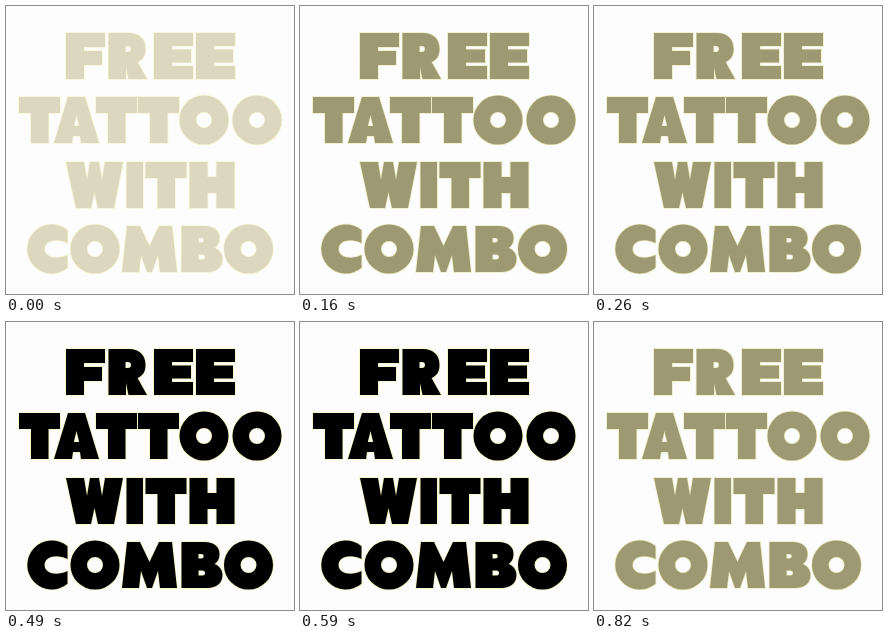
An HTML page for the animation above (980 ms loop, 288 by 288 pixels).

```html
<!DOCTYPE html>
<html lang="en">
<head>
<meta charset="utf-8">
<title>Free tattoo with combo</title>
<style>
  html, body { margin: 0; width: 100%; height: 100%; overflow: hidden; background: #fdfdfe; }
  svg { display: block; width: 100%; height: 100%; }
  path { fill-rule: evenodd; stroke-width: 1.6; paint-order: stroke; }
</style>
</head>
<body>
<svg viewBox="0 0 288 288" role="img" aria-label="Free tattoo with combo"></svg>
<script>
// Heavy geometric capitals, 46 units tall, measured from their top left corner.
const glyphs = {
  F: 'M0 0H39V14H18V18H36V32H18V46H0Z',
  R: 'M0 0H20C32 0 37 7 37 16C37 23 34 27 29 29L38.5 46H20L17.5 34V46H0Z M17 13V19H19.5A3 3 0 0 0 19.5 13Z',
  E: 'M0 0H39V13H18V16.5H37V29.5H18V33H39V46H0Z',
  T: 'M0 0H41V16H29.5V46H12V16H0Z',
  A: 'M14 0H31L45 46H27L26 39H19L18 46H0Z M22.5 18L19.8 29H25.2Z',
  O: 'M0 23A24.5 24.5 0 0 1 49 23A24.5 24.5 0 0 1 0 23Z M16.5 23A8 8 0 0 0 32.5 23A8 8 0 0 0 16.5 23Z',
  W: 'M0 0H18L21 18L24 0H33L36 18L39 0H57L48 46H32L28.5 30L25 46H10Z',
  I: 'M0 0H16.5V46H0Z',
  H: 'M0 0H18V15H27V0H45V46H27V31H18V46H0Z',
  C: 'M40 4.2A24.5 24.5 0 1 0 40 41.8V29C30 34 17 32 17 23C17 14 30 12 40 17Z',
  M: 'M5 0H18L27.5 20L37 0H50L55 46H38L36 29L30 46H25L19 29L17 46H0Z',
  B: 'M0 0H23C33 0 38 5 38 12C38 17 36 20 33 22C38 24 41 28 41 33C41 41 35 46 26 46H0Z'
    + 'M17 12V16.5H20A2.2 2.2 0 0 0 20 12Z M17 28.5V33.5H21A2.5 2.5 0 0 0 21 28.5Z'
};

const lines = [
  { word: 'FREE', y: 27, x: [60, 102.5, 148, 190] },
  { word: 'TATTOO', y: 91, x: [13, 48, 90, 132, 173.5, 226.5] },
  { word: 'WITH', y: 156, x: [60, 120.5, 139.5, 183.5] },
  { word: 'COMBO', y: 220, x: [21.5, 64.5, 116, 175.5, 218] }
];

const svg = document.querySelector('svg');
svg.innerHTML = lines.map(({ word, y, x }) =>
  [...word].map((letter, i) =>
    `<path d="${glyphs[letter]}" transform="translate(${x[i]} ${y})"/>`
  ).join('')
).join('');

// Fill and edge tint of each fade level, from faint to solid.
const levels = [
  ['#dbd8bf', '#f9f7d2'],
  ['#9d9972', '#eeebc0'],
  ['#454014', '#c6c4b2'],
  ['#000000', '#f5f2b8']
];
const duration = 980;
const steps = [[0, 0], [160, 1], [330, 2], [490, 3], [660, 2], [820, 1]];

function draw() {
  const time = performance.now() % duration;
  const [, level] = steps.findLast(([start]) => start <= time);
  const [fill, edge] = levels[level];
  svg.setAttribute('fill', fill);
  svg.setAttribute('stroke', edge);
  requestAnimationFrame(draw);
}
draw();
</script>
</body>
</html>
```
